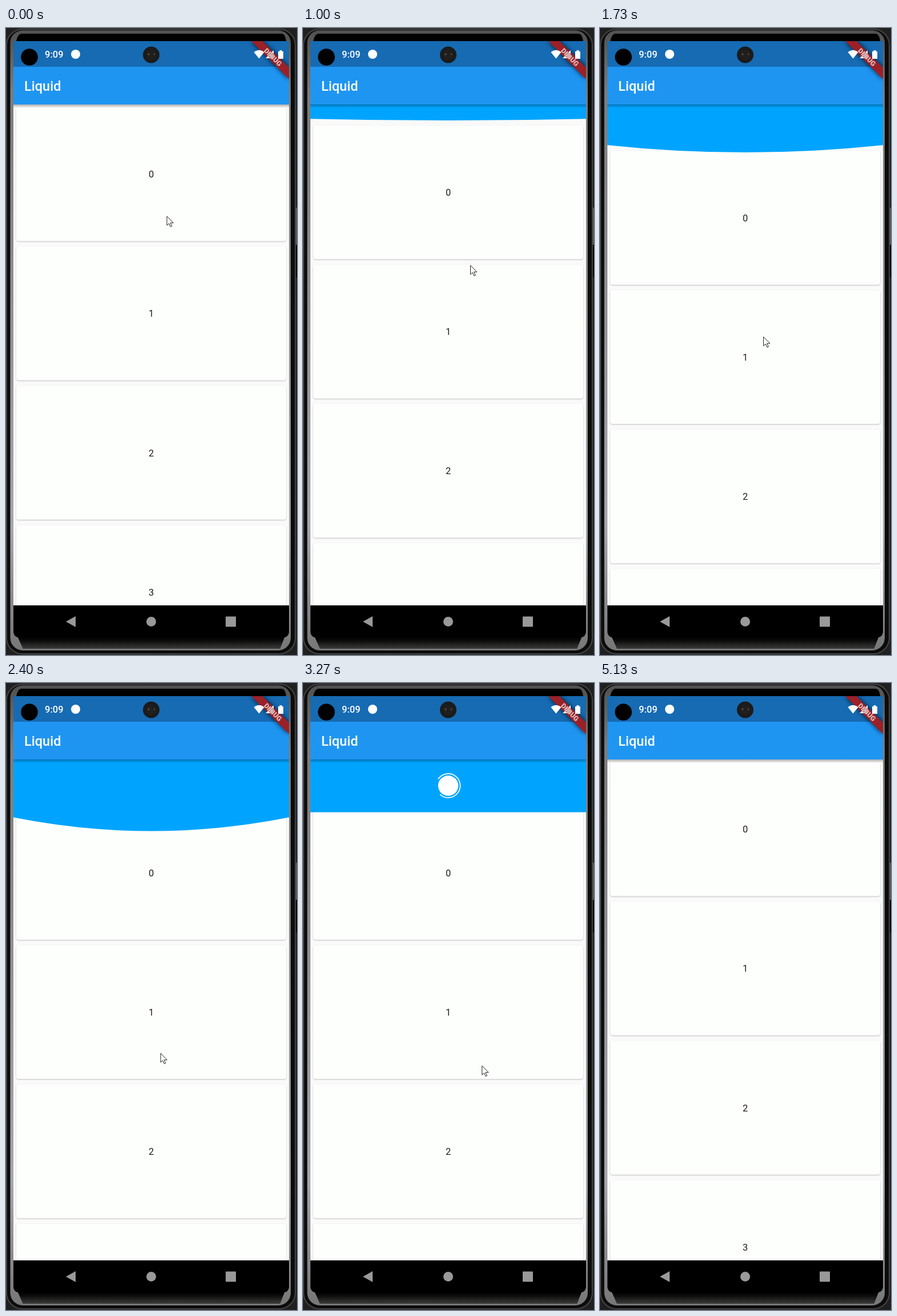
An HTML page for the animation above (5190 ms loop, 510x1099 px).

```html
<!DOCTYPE html>
<html lang="en">
<head>
<meta charset="utf-8">
<title>Liquid pull to refresh</title>
<style>
  html, body { margin: 0; width: 100%; height: 100%; overflow: hidden; background: #202020; }
  svg { display: block; width: 510px; height: 1099px; font-family: Roboto, sans-serif; }
  .card rect { fill: #fdfffd; filter: drop-shadow(0 1px 1px rgba(0, 0, 0, .24)); }
  .card text { font-size: 16.4px; fill: #1c1c1c; text-anchor: middle; }
</style>
</head>
<body>
<svg viewBox="0 0 510 1099">
  <defs>
    <clipPath id="screen"><path d="M13 23H496V1058Q495 1067 488 1068H21Q14 1067 13 1058Z"/></clipPath>
    <clipPath id="body"><rect x="13" y="134" width="483" height="878"/></clipPath>
    <linearGradient id="metal" x2="0" y2="1">
      <stop stop-color="#505050"/><stop offset=".1" stop-color="#7c7c7c"/>
      <stop offset=".8" stop-color="#a4a7ac"/><stop offset="1" stop-color="#777"/>
    </linearGradient>
    <linearGradient id="chin" x2="0" y2="1">
      <stop stop-color="#000"/><stop offset=".3" stop-color="#0c0c0c"/><stop offset="1" stop-color="#3c3c3a"/>
    </linearGradient>
    <linearGradient id="shade" x2="0" y2="1">
      <stop stop-opacity=".3"/><stop offset="1" stop-opacity="0"/>
    </linearGradient>
  </defs>

  <!-- phone shell -->
  <rect x="1" y="2" width="506" height="1095" rx="28" fill="#0c0c0c" stroke="#444" stroke-width="2"/>
  <rect x="7.500" y="4" width="491.500" height="1087" rx="22" fill="url(#metal)"/>
  <path d="M26 10H484Q490 12 491 23H496V1058Q495 1067 488 1068L480 1088H30L21 1068Q14 1067 13 1058V23H18Q20 12 26 10Z"/>
  <path d="M21 1068H488L480 1088H30Z" fill="url(#chin)"/>
  <path d="M509 315v65" stroke="#5a5a5a" stroke-width="2"/>
  <path d="M509 380v57" stroke="#000" stroke-width="2"/>

  <g clip-path="url(#screen)">
    <path d="M13 134H496V1012H13Z" fill="#f9faf9"/>
    <g clip-path="url(#body)">
      <g id="cards"></g>
      <path id="liquid" fill="#00a4ff"/>
      <circle id="ball" cx="254.5" fill="#fff"/>
      <path id="ring" fill="none" stroke="#fff" stroke-width="1.700"/>
      <rect x="13" y="134" width="483" height="6" fill="url(#shade)"/>
    </g>

    <path d="M13 68H496V134H13Z" fill="#1f95f2"/>
    <path d="M13 23H496V68H13Z" fill="#166bb3"/>
    <g fill="#fff" font-weight="500">
      <text x="32" y="110" font-size="23.5">Liquid</text>
      <text x="68" y="52" font-size="16.5">9:09</text>
      <circle cx="122" cy="46" r="8"/>
    </g>
    <path d="M430 23H449.500L496 69.500V89.500Z" fill="#9c2027" style="filter:drop-shadow(0 0 4px rgba(0,0,0,.85))"/>
    <g fill="#fff">
      <path d="M434.500 42.500Q443.500 35 452.500 42.500L443.500 53.500Z"/>
      <path d="M469 39V53H455Z"/>
      <path d="M477 41h2.500v-2h4v2h2.500v13h-9Z"/>
    </g>
    <text transform="translate(467.800 51.200) rotate(45)" y="4.200" font-size="12" font-weight="900" text-anchor="middle" fill="#dcc4c4" stroke="#9c2027" stroke-width=".8" paint-order="stroke">DEBUG</text>

    <path d="M13 1012H496V1068H13Z"/>
    <g fill="#999">
      <path d="M105 1040.500L122 1031V1050Z"/>
      <circle cx="254.500" cy="1040.500" r="8.500"/>
      <rect x="385" y="1031.500" width="18" height="18" rx="1"/>
    </g>
  </g>

  <circle cx="41" cy="51" r="14.800"/>
  <circle cx="254.500" cy="47" r="14.500" fill="#1b1b1b"/>
  <circle cx="254.500" cy="47" r="9" fill="#211f1e"/>
  <g fill="#5c554e"><circle cx="250" cy="46" r="1.600"/><circle cx="260" cy="46" r="1.200"/></g>

  <path id="cursor" d="M0 0V16L3.700 12.600L6.300 18.500L8.700 17.400L6.100 11.700H11.300Z" fill="#fff" stroke="#222"/>
</svg>

<script>
const LOOP = 5190, STEP = 200 / 3, MID = 254.5, TOP = 134;
const el = id => document.getElementById(id);
const clamp = x => Math.max(0, Math.min(1, x));
const ramp = (t, from, to) => clamp((t - from) / (to - from));
const ease = x => x * x * (3 - 2 * x);

// Linear track through [time, value] points.
function track(t, points) {
  let value = points[0][1];
  for (let i = 1; i < points.length; i++) {
    const [t0] = points[i - 1], [t1, v1] = points[i];
    value += (v1 - points[i - 1][1]) * ramp(t, t0, t1);
  }
  return value;
}

for (let i = 0; i < 4; i++) {
  const y = 138.7 + 244.2 * i;
  el("cards").innerHTML += `<g class="card"><rect x="18" y="${y}" width="473" height="234.700" rx="4"/>
    <text x="${MID}" y="${y + 123.5}">${i}</text></g>`;
}

function drawLiquid(t, closing) {
  const edge = TOP + closing * track(t, [[700, 0], [1330, 53], [2400, 101.5], [2470, 101.5], [2670, 92.6]]);
  const pull = track(t, [[700, 0], [1330, 6], [2400, 24]]);
  const wobble = t > 2430 ? Math.exp((2430 - t) / 130) * Math.cos((t - 2430) / 55) : 1;
  const sag = t > 3150 ? 0 : pull * wobble;
  const peak = 52 * ease(ramp(t, 2700, 2850)) * (1 - ease(ramp(t, 2920, 3080)));
  const low = edge + sag;
  el("liquid").setAttribute("d", peak > .5
    ? `M13 ${TOP}V${edge}Q${MID - 140} ${low} ${MID - 70} ${low}
       C${MID - 30} ${low} ${MID - 25} ${edge - peak} ${MID} ${edge - peak}
       S${MID + 30} ${low} ${MID + 70} ${low}Q${MID + 140} ${low} 496 ${edge}V${TOP}Z`
    : `M13 ${TOP}V${edge}Q${MID} ${edge + 2 * sag} 496 ${edge}V${TOP}Z`);
}

function drawSpinner(t) {
  const rise = ease(ramp(t, 2780, 3000)), leave = ramp(t, 4400, 4530);
  el("ball").setAttribute("cy", 228 - 48 * rise);
  el("ball").setAttribute("r", 17.7 * rise * (1 - leave));

  const gone = ramp(t, 4340, 4440), radius = 21 * (1 + .25 * gone);
  const start = (215 + (t - 3270) * 630 / 1060) * Math.PI / 180;
  const sweep = 2 * Math.PI * (.5 + .28 * Math.cos((t - 3270) / 530 * 2 * Math.PI));
  const point = a => `${MID + radius * Math.cos(a)} ${180 + radius * Math.sin(a)}`;
  el("ring").setAttribute("d",
    `M${point(start)}A${radius} ${radius} 0 ${+(sweep > Math.PI)} 1 ${point(start + sweep)}`);
  el("ring").style.opacity = ramp(t, 3000, 3130) * (1 - gone);
}

function draw(t) {
  const x = track(t, [[200, 282], [670, 291], [1330, 296], [2400, 271], [2600, 271], [3270, 314]]);
  const y = track(t, [[200, 330], [670, 356], [1330, 476], [2400, 649], [2600, 655], [3270, 671]]);
  const cursor = el("cursor");
  cursor.setAttribute("transform", `translate(${x} ${y})`);
  cursor.style.display = t < 3450 ? "" : "none";

  const closing = 1 - ease(ramp(t, 4400, 4660));
  el("cards").setAttribute("transform", `translate(0 ${closing * Math.min(76.5, .37 * (y - 330))})`);
  drawLiquid(t, closing);
  drawSpinner(t);
}

const began = performance.now();
function tick() {
  const t = (performance.now() - began) % LOOP;
  draw(Math.floor((t + 5) / STEP) * STEP);
  requestAnimationFrame(tick);
}
tick();
</script>
</body>
</html>
```
